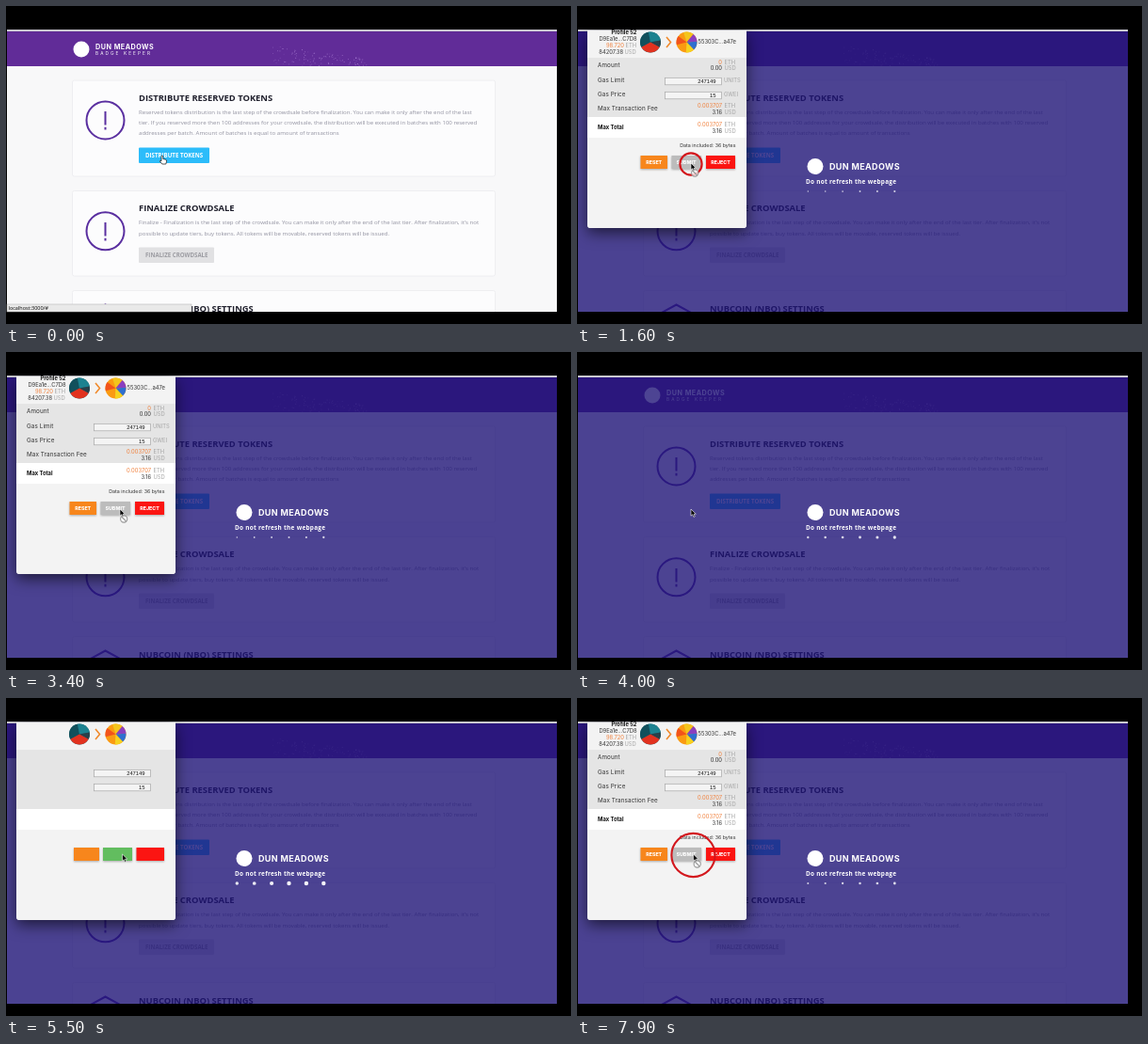
Recreate the animation shown at these times as an HTML page. Size 600x338 px, loop 8000 ms.

```html
<!DOCTYPE html>
<html lang="en">
<head>
<meta charset="utf-8">
<style>
html, body { margin: 0; height: 100%; overflow: hidden; background: #000; }
svg { display: block; width: 100vw; height: 100vh; }
text { font-family: "Open Sans", sans-serif; }
.head { font-size: 9.38px; font-weight: 700; fill: #1f1f2c; }
.body { font-size: 6.09px; fill: #9292a0; }
.btn { font-size: 6.15px; font-weight: 700; }
.brand { font-family: Inter, sans-serif; fill: #fff; font-weight: 700; }
#popup { filter: drop-shadow(0 5px 8px rgba(0,0,0,.6)); }
#popup text { font-family: Inter, sans-serif; font-size: 5.8px; fill: #333; }
#popup .label { font-size: 6.3px; letter-spacing: .1px; }
#popup .unit { fill: #a5a5a5; }
#popup .hot { fill: #f0803c; }
#popup .bold { font-weight: 700; fill: #111; }
#popup .field { font-family: "Liberation Sans", sans-serif; fill: #111; }
#popup .act { font-size: 5.3px; font-weight: 800; fill: #fff; text-anchor: middle; }
.end { text-anchor: end; }
</style>
</head>
<body>
<svg viewBox="0 0 600 338" preserveAspectRatio="none">
  <rect width="600" height="338"/>
  <clipPath id="view"><rect x="1" y="27" width="584" height="298"/></clipPath>
  <g clip-path="url(#view)">
    <rect y="27" width="600" height="300" fill="#f8f8f9"/>
    <rect y="27" width="600" height="37" fill="#612c98"/>
    <g id="stars" fill="#b88fe0"></g>
    <circle cx="80" cy="46" r="8.5" fill="#fff"/>
    <text class="brand" x="95" y="45.5" font-size="7.2" letter-spacing=".5">DUN MEADOWS</text>
    <text class="brand" x="95" y="52.3" style="font-size:4.7px;font-weight:400;letter-spacing:2.1px">BADGE KEEPER</text>
    <g fill="#fcfcfd" stroke="#eeeef1">
      <rect x="70.5" y="79" width="449" height="102" rx="2"/>
      <rect x="70.5" y="196.500" width="449" height="90.500" rx="2"/>
      <rect x="70.5" y="302.500" width="449" height="60" rx="2"/>
    </g>
    <g fill="none" stroke="#5a2fa0" stroke-width="2">
      <circle cx="105.500" cy="121.500" r="20"/>
      <circle cx="105.500" cy="239.300" r="20"/>
      <path d="M105.500 112v14.500m0 2.300v2.600M105.500 230v14.500m0 2.300v2.600M88 327l17.500-9.500 17.500 9.500"/>
    </g>
    <text class="head" x="141" y="101">DISTRIBUTE RESERVED TOKENS</text>
    <text class="body" x="141" y="115">Reserved tokens distribution is the last step of the crowdsale before finalization. You can make it only after the end of the last</text>
    <text class="body" x="141" y="126.200">tier. If you reserved more then 100 addresses for your crowdsale, the distribution will be executed in batches with 100 reserved</text>
    <text class="body" x="141" y="137.400">addresses per batch. Amount of batches is equal to amount of transactions</text>
    <rect x="141" y="150.500" width="75" height="16.500" rx="1" fill="#2cbcfa"/>
    <text class="btn" x="148" y="161" fill="#fff">DISTRIBUTE TOKENS</text>
    <text class="head" x="141" y="218.200">FINALIZE CROWDSALE</text>
    <text class="body" x="141" y="232.300">Finalize - Finalization is the last step of the crowdsale. You can make it only after the end of the last tier. After finalization, it's not</text>
    <text class="body" x="141" y="243.500">possible to update tiers, buy tokens. All tokens will be movable, reserved tokens will be issued.</text>
    <rect x="141" y="256.500" width="80" height="16.500" rx="1" fill="#e1e1e3"/>
    <text class="btn" x="148" y="267.200" fill="#9b9ba1">FINALIZE CROWDSALE</text>
    <text class="head" x="141" y="324.500">NUBCOIN (NBQ) SETTINGS</text>
  </g>
  <rect x="1" y="25" width="584" height="2" fill="#c9c9cf"/>
  <g id="loader">
    <rect x="1" y="27" width="584" height="298" fill="rgb(30,19,119)" fill-opacity=".79"/>
    <circle cx="253" cy="170.500" r="8.500" fill="#fff"/>
    <text class="brand" x="268" y="173.500" font-size="9" letter-spacing=".35">DUN MEADOWS</text>
    <text x="243" y="188.700" fill="#fff" style="font-size:6.4px;font-weight:700;letter-spacing:.3px">Do not refresh the webpage</text>
    <g id="dots" fill="#fff"></g>
  </g>
  <g id="status">
    <rect x="1" y="317" width="196" height="8" fill="#e9e9e9" stroke="#aaa" stroke-width=".5"/>
    <text x="2.500" y="323.200" font-size="5.500">localhost:3000/#</text>
  </g>
  <g id="popup">
    <path d="M11 26h169v206.500q0 3.500-3.500 3.500h-162q-3.500 0-3.500-3.500z" fill="#fdfdfd"/>
    <g id="form">
      <path d="M11 26h169v206.500q0 3.500-3.500 3.500h-162q-3.500 0-3.500-3.500z" fill="#f3f3f3"/>
      <rect x="11" y="55" width="169" height="63" fill="#e5e5e5"/>
      <rect x="11" y="118" width="169" height="22" fill="#fff"/>
      <g id="pies"></g>
      <path d="M95 33l4.500 5.500-4.500 5.500" fill="none" stroke="#f08a2c" stroke-width="1.600"/>
      <g fill="#f4f4f4" stroke="#a9a9a9" stroke-width=".7">
        <rect x="93.500" y="76.300" width="60" height="7.500"/>
        <rect x="93.500" y="91.300" width="60" height="7.500"/>
      </g>
      <text class="field end" x="147.500" y="82.200">247149</text>
      <text class="field end" x="147.500" y="97.200">15</text>
      <g id="buttons" style="filter:drop-shadow(0 1px 1px rgba(0,0,0,.3))">
        <rect y="159" height="14" fill="#f7861c"/>
        <rect y="159" height="14"/>
        <rect y="159" height="14" fill="#fb1512"/>
      </g>
      <g id="words"></g>
    </g>
  </g>
  <circle id="ring" fill="none" stroke="#d3161c" stroke-width="2.100"/>
  <g id="cursor">
    <path id="arrow" d="M0 0v7.200l1.700-1.500 1.200 2.700 1.300-.6-1.200-2.600h2.300z" stroke="#fff" stroke-width=".6"/>
    <g id="ban" fill="none" stroke="#999" stroke-width="1.100">
      <circle cx="4.200" cy="10.500" r="3.600" fill="#fff" fill-opacity=".75"/>
      <path d="M1.700 8l5 5"/>
    </g>
    <path id="hand" d="M0 0q1-1 1.800 0v3l3 .8q1 .4.700 2l-.7 2.700h-4l-2.500-3q0-1.200 1.700-.2z" fill="#fff" stroke="#111" stroke-width=".7"/>
  </g>
</svg>
<script>
const LOOP = 8000;
const CLICKS = [1500, 7700];
const POPUPS = [
  { open: 700, form: 900, words: 1100, click: 1500, close: 3500 },
  { open: 4600, form: 5400, words: 6500, click: 7700, close: LOOP }
];
const $ = id => document.getElementById(id);
const show = (id, on) => $(id).style.display = on ? "" : "none";
const ramp = (t, a, b) => Math.min(1, Math.max(0, (t - a) / (b - a)));
const ease = u => u * u * (3 - 2 * u);

function add(parent, tag, attrs, text = "") {
  const el = document.createElementNS("http://www.w3.org/2000/svg", tag);
  for (const key in attrs) el.setAttribute(key, attrs[key]);
  el.textContent = text;
  return $(parent).appendChild(el);
}

// Faint speckles in the header
let seed = 7;
const random = () => (seed = seed * 16807 % 2147483647) / 2147483647;
for (let i = 0; i < 110; i++) {
  const u = random();
  add("stars", "rect", {
    x: 283 + u * 100, y: 63 - random() * (21 - 13 * u),
    width: .8, height: .8, opacity: .3 + random() * .6
  });
}

// Pie avatars: [start, end, colour] in turns
function pie(cx, cy, base, slices) {
  add("pies", "circle", { cx, cy, r: 11, fill: base });
  for (const [a, b, fill] of slices) {
    const at = u => `${cx + 11 * Math.cos(u * 2 * Math.PI)} ${cy + 11 * Math.sin(u * 2 * Math.PI)}`;
    add("pies", "path", { d: `M${cx} ${cy}L${at(a)}A11 11 0 ${+(b - a > .5)} 1 ${at(b)}z`, fill });
  }
}
pie(78, 38.5, "#17606e", [[.42, .72, "#12505c"], [.72, .97, "#1d8290"], [-.03, .08, "#29404a"], [.08, .42, "#e2321f"]]);
pie(116.5, 38.5, "#fa9a12", [[.7, .86, "#f3c51c"], [.86, .99, "#8a3fc0"], [-.01, .13, "#2f6fd0"], [.13, .26, "#f6d21f"], [.46, .6, "#f2531b"]]);

const word = (x, y, cls, text) => add("words", "text", { x, y, class: cls }, text);
word(63.5, 30.3, "bold end", "Profile 52");
word(63.5, 37.4, "end", "D9Ea1e...C7D8");
word(50, 44.2, "hot end", "98.720");
word(51.5, 44.2, "unit", "ETH");
word(49, 50.8, "end", "84207.38");
word(50.5, 50.8, "unit", "USD");
word(128.5, 40.3, "", "55303C...a47e");
[["Amount", 64.5], ["Gas Limit", 81], ["Gas Price", 96], ["Max Transaction Fee", 111.3]]
  .forEach(([s, y]) => word(22, y, "label", s));
word(22, 130.7, "bold", "Max Total");
[[62, "0", "0.00"], [108.3, "0.003707", "3.16"], [128.3, "0.003707", "3.16"]].forEach(([y, eth, usd]) => {
  word(154, y, "hot end", eth);
  word(156.5, y, "unit", "ETH");
  word(154, y + 6.3, "end", usd);
  word(156.5, y + 6.3, "unit", "USD");
});
word(156, 80.5, "unit", "UNITS");
word(156, 95.5, "unit", "GWEI");
word(168.5, 149.5, "end", "Data included: 36 bytes").style.fontSize = "5.3px";
[["RESET", 81.7], ["SUBMIT", 116], ["REJECT", 152.5]].forEach(([s, x]) => word(x, 168, "act", s));

const dots = [...Array(6)].map((_, i) => add("dots", "circle", { cx: 245.3 + 18.4 * i, cy: 197 }));
const buttons = [...$("buttons").children];
const LAYOUT = { bare: [[72, 27], [103, 31], [138.5, 29.5]], full: [[67.5, 28.5], [100.5, 31.5], [137, 31]] };

function draw(t) {
  $("loader").style.opacity = ramp(t, 100, 300);
  show("status", t < 600);

  const phase = t < 400 ? 0 : ((t + 200) / 940) % 1;
  dots.forEach((dot, i) => {
    const fall = Math.max(0, phase + .09 - .07 * i) ** .6;
    dot.setAttribute("r", t < 400 ? 2.2 : 2.2 - 1.45 * Math.min(1, fall));
    dot.setAttribute("opacity", t < 400 ? .55 : .95 - .25 * fall);
  });

  const pop = POPUPS.find(p => t >= p.open && t < p.close);
  const full = pop && t >= pop.words, sent = pop && t >= pop.click;
  show("popup", pop);
  show("form", pop && t >= pop.form);
  show("words", full);
  buttons.forEach((b, i) => {
    const [x, width] = LAYOUT[full ? "full" : "bare"][i];
    b.setAttribute("x", x);
    b.setAttribute("width", width);
  });
  buttons[1].setAttribute("fill", sent ? "#bcbcbc" : "#62bd5f");

  const go = ease(ramp(t, 600, 1300)), nudge = ease(ramp(t, 4800, 5400));
  const x = 165 - 44 * go + 2.5 * nudge, y = 159.5 + 7.5 * go - 1 * nudge;
  $("cursor").setAttribute("transform", `translate(${x} ${y})`);
  show("hand", t < 200);
  show("arrow", t >= 200);
  show("ban", sent);

  const age = t - (CLICKS.find(c => t > c && t < c + 300) ?? t);
  const ring = $("ring");
  show("ring", age > 0);
  ring.setAttribute("cx", x);
  ring.setAttribute("cy", y + 1);
  ring.setAttribute("r", age * .115);
  ring.setAttribute("opacity", 1 - ramp(age, 200, 300));
}

const start = performance.now();
function tick() {
  draw((performance.now() - start) % LOOP);
  requestAnimationFrame(tick);
}
tick();
</script>
</body>
</html>
```
